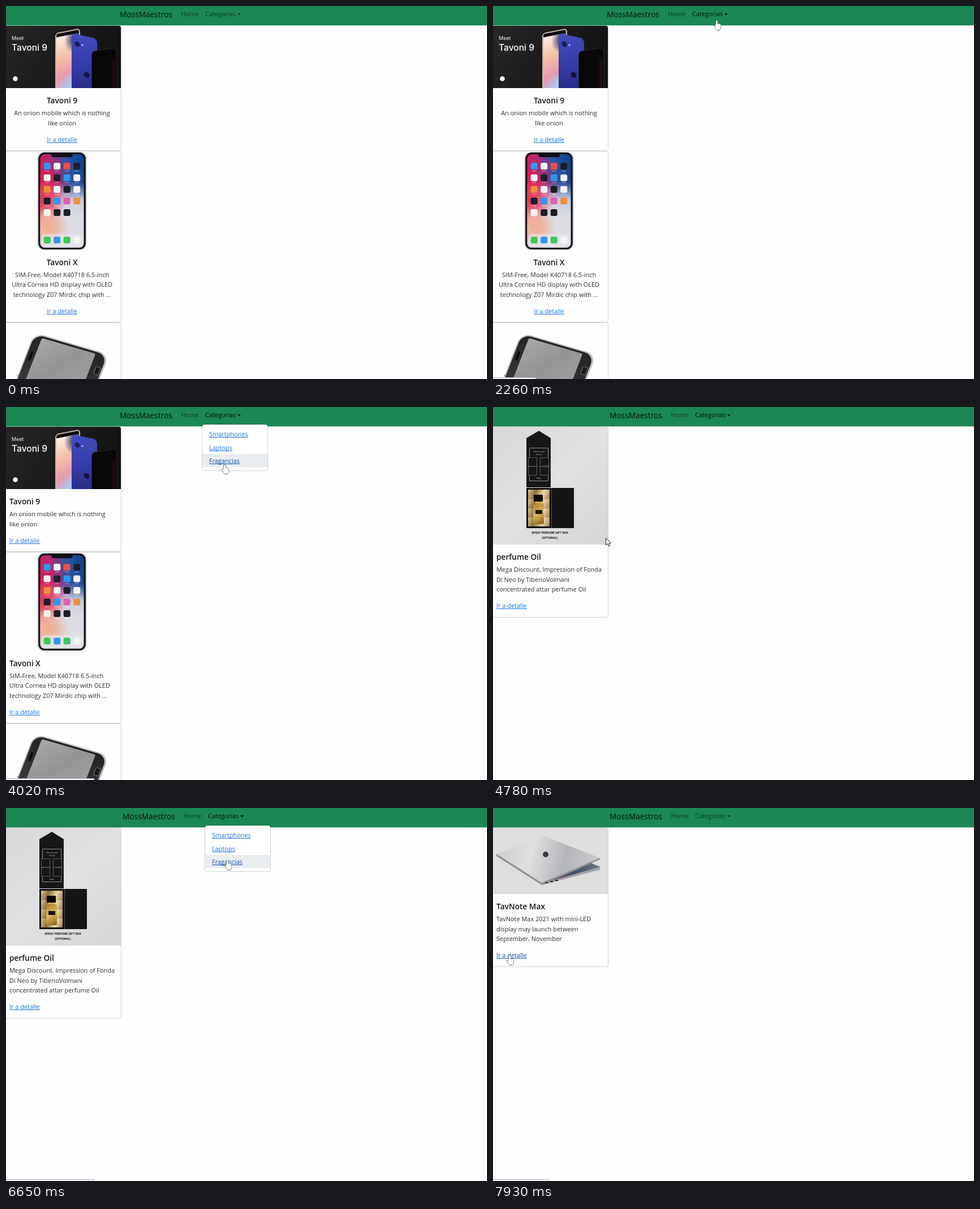
An HTML page with a canvas that plays this animation: 850 px wide and 659 px high, repeating every 8 s.

```html
<!DOCTYPE html>
<html lang="es">
<head>
<meta charset="utf-8">
<title>Tienda</title>
<style>
html, body { margin: 0; width: 100%; height: 100%; overflow: hidden; background: #fefefe; }
canvas { display: block; width: 850px; height: 659px; }
</style>
</head>
<body>
<canvas id="stage" width="850" height="659"></canvas>
<script>
const ctx = document.getElementById('stage').getContext('2d');
const LOOP = 8000;
const SANS = '"Open Sans", "Noto Sans", sans-serif';
const BODY = '10.95px ' + SANS, TITLE = '600 13.7px ' + SANS;
const LINK = '#1675f6', LINK_HOVER = '#0a55bd', BORDER = 'rgba(0,0,0,.175)';

// ---- helpers ----
function text(str, x, y, font, color, align = 'left') {
  ctx.font = font;
  ctx.fillStyle = color;
  ctx.textAlign = align;
  ctx.fillText(str, x, y);
  return ctx.measureText(str).width;
}
function link(str, x, y, color, align = 'left') {
  const w = text(str, x, y, BODY, color, align);
  rect(Math.round(align === 'center' ? x - w / 2 : x), y + 1, Math.round(w), 1, color);
}
function paint(fill, stroke) {
  if (fill) { ctx.fillStyle = fill; ctx.fill(); }
  if (stroke) { ctx.strokeStyle = stroke; ctx.lineWidth = 1; ctx.stroke(); }
}
function rect(x, y, w, h, color) {
  ctx.fillStyle = color;
  ctx.fillRect(x, y, w, h);
}
function round(x, y, w, h, r, fill, stroke) {
  ctx.beginPath();
  ctx.roundRect(x, y, w, h, r);
  paint(fill, stroke);
}
function poly(points, fill, stroke) {
  ctx.beginPath();
  points.forEach(([x, y]) => ctx.lineTo(x, y));
  ctx.closePath();
  paint(fill, stroke);
}
function dot(x, y, r, fill) {
  ctx.beginPath();
  ctx.arc(x, y, r, 0, 7);
  paint(fill);
}
function stops(gradient, colors) {
  colors.forEach((c, i) => gradient.addColorStop(i / (colors.length - 1), c));
  return gradient;
}
const shade = (x0, y0, x1, y1, ...colors) => stops(ctx.createLinearGradient(x0, y0, x1, y1), colors);
function glow(x, y, r, rgb) {
  dot(x, y, r, stops(ctx.createRadialGradient(x, y, 0, x, y, r), [`rgba(${rgb},1)`, `rgba(${rgb},.7)`, `rgba(${rgb},0)`]));
}
// Draws inside a plane leaning along the axes u and v.
function plane(x, y, [ux, uy], [vx, vy], fn) {
  ctx.save();
  ctx.transform(ux, uy, vx, vy, x, y);
  fn();
  ctx.restore();
}
function clipped(x, y, w, h, r, fn) {
  ctx.save();
  ctx.beginPath();
  ctx.roundRect(x, y, w, h, r);
  ctx.clip();
  fn();
  ctx.restore();
}

// ---- product pictures, drawn from their own top edge ----
function trioPicture() {
  rect(0, 0, 203, 110, shade(0, 0, 203, 110, '#262626', '#1b1b1c', '#101011'));
  text('Meet', 10, 25, '9px Inter, sans-serif', '#f4f4f4');
  text('Tavoni 9', 10, 44, '500 15.6px Inter, sans-serif', '#ffffff');
  dot(16.5, 93.5, 4.3, '#ffffff');

  const down = [0, 1];
  plane(87, 13, [1, -.2], down, () => {
    round(0, 0, 44, 130, 6, '#cbb2a4');
    clipped(2, 2, 40, 130, 4, () => {
      rect(0, 0, 44, 130, shade(0, 10, 30, 110, '#fbeee4', '#f3c3a6', '#e898ac', '#a9c9ee'));
      glow(42, 18, 26, '27,34,84');
      glow(38, 100, 30, '170,205,240');
      rect(0, 0, 44, 8, '#0d0d10');
    });
  });
  plane(116, 13, [1, .22], down, () => {
    round(0, 0, 45, 130, 7, shade(0, 0, 45, 110, '#454cc0', '#353ba6', '#20246f'));
    dot(10, 17, 4.6, '#1a1d57');
    dot(19, 17, 1.4, '#d8d8ee');
    dot(26.5, 68, 5, '#12143f');
  });
  plane(151, 45, [1, -.16], down, () => {
    round(.5, .5, 44, 130, 6, '#080809', '#2b2528');
    rect(34, 20, 8, 60, shade(34, 0, 42, 0, '#080809', '#2c0d14'));
  });
}

const HUES = { b: '#2f97ee', w: '#f4f3f2', o: '#ee9038', k: '#1c1f26', p: '#e160b4', g: '#3bc95c', r: '#e8504a' };
const ICONS = ['bwrk', 'wkbw', 'owkw', 'kbpo', 'wkk', 'gbgw'];
function appPhonePicture() {
  round(56, 1, 86, 173, 12, '#9b9da2');
  round(57.5, 2, 83, 171, 11, '#101014');
  clipped(60.5, 5, 77, 165, 8, () => {
    rect(60, 4, 78, 167, shade(60, 50, 138, 30, '#e31650', '#b02a70', '#2d53a2', '#0c4590'));
    rect(60, 55, 78, 116, shade(0, 55, 0, 115, 'rgba(214,217,228,0)', 'rgba(214,217,228,.9)', '#dcdce2'));
    glow(60, 85, 46, '230,48,78');
    glow(74, 132, 36, '241,172,146');
    round(63, 146, 72, 21, 6, 'rgba(235,235,240,.55)');
  });
  round(80, 4, 38, 6, [0, 0, 4, 4], '#101014');
  ICONS.forEach((row, r) => [...row].forEach((hue, c) => {
    const dock = r === 5, x = 66.7 + c * 17.5, y = dock ? 150.5 : 20 + r * 20.5;
    round(x, y, 12, 12, 3, HUES[hue]);
    if (!dock) rect(x + 2, y + 14, 8, 1, 'rgba(255,255,255,.5)');
  }));
}

function tiltedPhonePicture() {
  rect(20, 92, 60, 10, '#19191b');
  plane(50, 17, [.96, .28], [-.36, .93], () => {
    round(0, 0, 138, 130, 18, '#bfc1c4');
    round(2, 2, 133, 130, 17, shade(0, 0, 0, 90, '#232325', '#39393c'));
    round(16, 5.5, 99, 130, 3, shade(16, 0, 115, 80, '#a9a9a9', '#949494', '#a2a2a2'));
    round(7, 33, 4, 17, 2, '#0b0b0c');
    round(124, 27, 9, 14, 2, '#1b1b1d', '#77777a');
  });
}

function perfumePicture() {
  rect(0, 0, 203, 208, shade(0, 0, 203, 208, '#d8d8d8', '#e1e1e1', '#d6d6d6'));
  poly([[59, 20], [81, 7], [102, 20], [102, 107], [59, 107]], '#171717');
  round(64.5, 37.5, 33, 58, 0, null, '#8d8d8d');
  [62.5, 83.5].forEach(x => round(x, 54.5, 15, 31, 0, '#171717', '#5d5d5d'));
  const note = (str, x, y) => text(str, x, y, '3.4px Roboto, sans-serif', '#b5b5b5', 'center');
  note('Choose a gift', 81, 45);
  note('for you', 81, 50);
  note('soft scent', 70, 71);
  note('a small gift', 91, 71);
  note('Enjoy', 81, 92);

  rect(59, 108, 44, 71, '#0f0d0a');
  for (let i = 0; i < 4; i++) {
    const y = 111 + i * 16.25;
    rect(62, y, 38, 16.25, shade(62, y, 100, y + 16, '#dcc793', '#8b6e3c', '#ead9ac', '#a6843e'));
  }
  round(72, 120, 16, 12, 1, '#0b0908');
  rect(75, 132, 10, 4, '#cda94d');
  round(71, 135, 19, 37, 3, shade(71, 135, 90, 172, '#b07f30', '#dfb95c', '#8a5a1b'));
  rect(75, 147, 12, 7, '#17120c');
  rect(103, 108, 40, 71, '#151515');
  rect(103, 108, 1, 71, '#55524d');
  const caption = (str, y) => text(str, 100.5, y, '700 5.2px Roboto, sans-serif', '#1c1c1c', 'center');
  caption('SPRAY PERFUME GIFT BOX', 189);
  caption('(OPTIONAL)', 198);
}

function laptopPicture() {
  rect(0, 0, 203, 117, '#dedede');
  poly([[85, 97], [189, 67], [189, 74], [88, 101]], '#a3a4a7');
  poly([[110, 86], [170, 61], [189, 69], [92, 97]], shade(100, 95, 189, 66, '#7c4a52', '#40506a', '#6f7885'));
  poly([[6, 46], [189, 53], [189, 56], [86, 101], [6, 50]], '#929396');
  poly([[6, 46], [91, 15], [189, 53], [86, 97]], shade(10, 30, 185, 70, '#cfcfd1', '#dfdfe1', '#b4b5b8', '#cbccce'));
  dot(93, 47, 5, '#3c3d40');
  for (let i = 0; i < 3; i++) rect(92 + 9 * i, 96 - 2 * i, 5, 2, '#2b2b2d');
}

// ---- products ----
const item = (title, h, draw, ...lines) => ({ title, h, draw, lines });
const PHONES = [
  item('Tavoni 9', 110, trioPicture, 'An onion mobile which is nothing', 'like onion'),
  item('Tavoni X', 173.5, appPhonePicture, 'SIM-Free, Model K40718 6.5-inch',
    'Ultra Cornea HD display with OLED', 'technology Z07 Mirdic chip with ...'),
  item('Belmora Meridian 9', 204, tiltedPhonePicture, "Belmora's new variant which goes", 'beyond Nebula to the Meridian'),
  item('VORDK47', 204, null, 'VORD K47 is officially announced on', 'April 2021.'),
  item('Rauvek Q58', 204, null, 'Rauvek\u2019s re-badged Q58 Max New', 'Edition was officially unveiled',
    'yesterday in Germany and now the', 'device has made its way to the UK.'),
  item('', 204, null)
];
const PERFUMES = [item('perfume Oil', 208, perfumePicture, 'Mega Discount, Impression of Fonda',
  'Di Neo by TiberioVolmani', 'concentrated attar perfume Oil')];
const LAPTOPS = [item('TavNote Max', 117, laptopPicture, 'TavNote Max 2021 with mini-LED',
  'display may launch between', 'September, November')];

const FIRST_CARD = 34, LEADING = 17.5;
const linkBaseline = (top, h, n) => Math.round(top + h + 60.5 + LEADING * n);

function cards(list, centered, images, overLink) {
  const align = centered ? 'center' : 'left', x = centered ? 99 : 6;
  let top = FIRST_CARD;
  for (const { title, h: full, draw, lines } of list) {
    if (top > 659) break;
    const h = images ? full : 0, n = lines.length, y = Math.round(top);
    const next = top + h + 77 + LEADING * n;
    round(-5.5, y + .5, 209, Math.round(next) - y - 1, 4, null, BORDER);
    if (h && draw) {
      clipped(-5, y + 1, 208, h, [0, 3.5, 0, 0], () => {
        ctx.translate(0, y + 1);
        draw();
      });
    }
    text(title, x, Math.round(top + h + 28), TITLE, '#15181b', align);
    lines.forEach((s, i) => text(s, x, Math.round(top + h + 49 + LEADING * i), BODY, '#2b2f33', align));
    if (n) link('Ir a detalle', x, linkBaseline(top, h, n), overLink ? LINK_HOVER : LINK, align);
    top = next;
  }
}

// ---- navigation ----
const ENTRIES = ['Smartphones', 'Laptops', 'Fragancias'], ENTRY_TOP = 36.5, ENTRY_H = 23.3;

function navbar(dx, active) {
  rect(0, 0, 850, 34.3, '#1b8755');
  text('MossMaestros', 201 + dx, 20, '13.7px ' + SANS, '#06110b');
  text('Home', 309.5 + dx, 18, BODY, 'rgba(0,0,0,.57)');
  const ink = `rgba(0,0,0,${active ? .9 : .57})`;
  text('Categorias', 352 + dx, 18, BODY, ink);
  poly([[409 + dx, 13], [415 + dx, 13], [412 + dx, 16.2]], ink);
}
function menu(dx, target) {
  round(347 + dx, 31, 115, 81, 3.5, '#ffffff');
  round(346.5 + dx, 30.5, 116, 82, 4, null, BORDER);
  ENTRIES.forEach((name, i) => {
    const over = name === target, y = ENTRY_TOP + ENTRY_H * i;
    if (over) rect(347 + dx, Math.round(y), 115, 23, '#e9ecef');
    link(name, 359 + dx, Math.round(y + 15.8), over ? LINK_HOVER : LINK);
  });
}
const STATUS_WIDTH = { Categorias: 76, Smartphones: 160, Laptops: 143, Fragancias: 156, detail: 98 };
function statusBar(w) {
  rect(0, 656, w, 3, '#a9b2c0');
  rect(0, 657, w - 1, 2, '#f6f7f8');
}

// ---- timeline ----
// Pointer moves: start, end, and the place it comes to rest.
const MOVES = [
  [0, 0, 741, 543], [190, 940, 178, -16], [1150, 1480, 204, 136], [1500, 2200, 395, 25],
  [2730, 3050, 388, 50], [3540, 3660, 388, 10], [3740, 4020, 386, 101], [4420, 5120, 29, 349],
  [5400, 5750, 338, 45], [5800, 6100, 392, 14], [6350, 6650, 391, 92], [6750, 6980, 390, 69],
  [7110, 7720, 29, 260]
];
const TO_PHONES = 3200, TO_PERFUMES = 4420, TO_LAPTOPS = 7110;
const MENU_CLICKS = [2730, TO_PHONES, 3700, TO_PERFUMES, 6260, TO_LAPTOPS];

const between = (t, a, b) => t >= a && t < b;
const menuOpen = t => MENU_CLICKS.filter(c => c <= t).length % 2 === 1;
const shift = t => t < TO_PERFUMES ? 0 : 5;
const listAt = t => t < TO_PERFUMES ? PHONES : t < TO_LAPTOPS ? PERFUMES : LAPTOPS;

function pointerAt(t) {
  let x, y;
  for (const [start, end, toX, toY] of MOVES) {
    if (t < start) break;
    const u = Math.min(1, (t - start) / (end - start || 1));
    const e = end ? u * u * (3 - 2 * u) : 1;
    x = end ? x + (toX - x) * e : toX;
    y = end ? y + (toY - y) * e : toY;
  }
  return { x: Math.round(x), y: Math.round(y) };
}

// Name of the clickable thing under the pointer.
function targetAt(t) {
  const { x, y } = pointerAt(t), left = 347 + shift(t), list = listAt(t);
  if (between(y, 0, 30) && between(x, left, left + 72)) return 'Categorias';
  if (menuOpen(t) && between(x, left, left + 115)) return ENTRIES[Math.floor((y - ENTRY_TOP) / ENTRY_H)];
  if (list !== PHONES && between(x, 6, 60)) {
    const { h, lines } = list[0];
    if (Math.abs(y + 4 - linkBaseline(FIRST_CARD, h, lines.length)) < 7) return 'detail';
  }
}

function draw(t) {
  const dx = shift(t), target = targetAt(t);
  const loading = between(t, 1080, 1690);
  const focused = between(t, 2730, 5400) || between(t, 6260, 7900);
  rect(0, 0, 850, 659, '#fefefe');
  cards(listAt(t), t < TO_PHONES, !loading, target === 'detail');
  navbar(dx, focused || target === 'Categorias');
  if (menuOpen(t)) menu(dx, target);
  const width = STATUS_WIDTH[targetAt(t - 60)];
  if (t > 60 && width) statusBar(width);
  if (t >= 190) drawPointer(pointerAt(t), target);
}

function drawPointer({ x, y }, hand) {
  const ink = '#1f2433', white = '#ffffff';
  plane(x + .5, y + .5, [1, 0], [0, 1], () => {
    if (!hand) return poly([[0, 0], [0, 12.5], [3, 10], [5, 14.5], [7, 13.6], [5.2, 9.4], [8.8, 9]], white, ink);
    // Outline first, then the fill joins palm and finger.
    for (const [fill, stroke] of [[null, ink], [white, null]]) {
      poly([[-5, 9], [-2, 9], [5, 16.5], [-1, 16.5]], fill, stroke);
      round(-2.5, 6, 9.5, 10.5, [1, 3, 3, 3], fill, stroke);
      round(-1.6, 0, 3.2, 10, 1.6, fill, stroke);
    }
  });
}

function tick() {
  draw(performance.now() % LOOP);
  requestAnimationFrame(tick);
}
tick();
</script>
</body>
</html>
```
